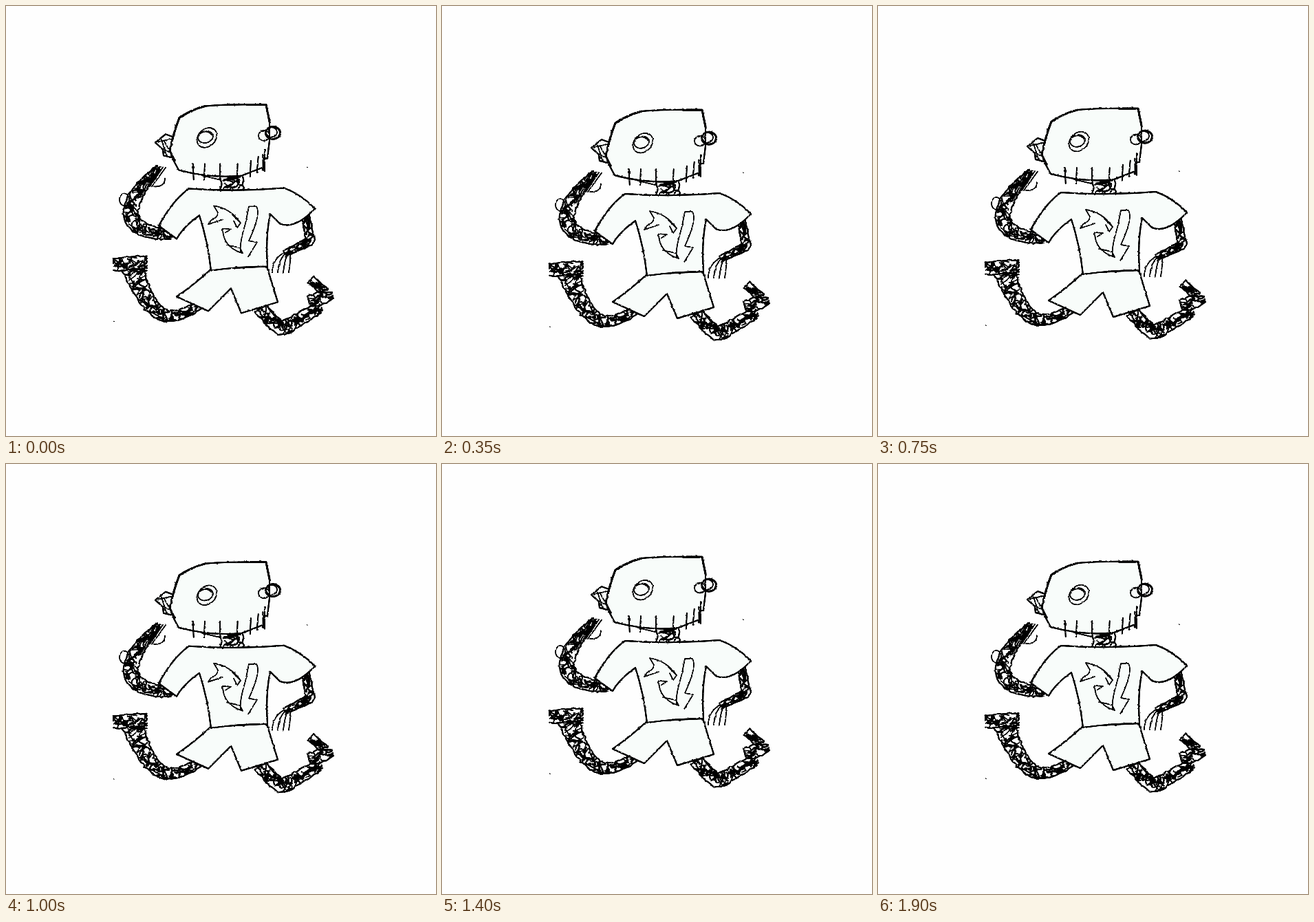
An HTML page for the animation above (1.95 s loop, 625x625 px).

```html
<!DOCTYPE html>
<html lang="en">
<head>
<meta charset="utf-8">
<title>Running doodle</title>
<style>
html, body { margin: 0; width: 100%; height: 100%; overflow: hidden; background: #fefefe }
svg { display: block; width: 100vw; height: 100vh }
path, ellipse { fill: none; stroke: #000; stroke-width: 1.4; stroke-linejoin: round; stroke-linecap: round }
.paper { fill: #fcfefd; stroke-width: 2 }
.bold { stroke-width: 2.7 }
</style>
</head>
<body>
<svg viewBox="0 0 625 625">
  <!-- wobbles the edges, then hardens the ink -->
  <filter id="ink" filterUnits="userSpaceOnUse" x="140" y="130" width="350" height="365" color-interpolation-filters="sRGB">
    <feTurbulence type="fractalNoise" baseFrequency=".25" numOctaves="2" seed="4"/>
    <feDisplacementMap in="SourceGraphic" scale="2.4" xChannelSelector="R" yChannelSelector="G"/>
    <feComponentTransfer>
      <feFuncR type="table" tableValues="0 0 .1 .6 .994"/>
      <feFuncG type="table" tableValues="0 0 .1 .6 .997"/>
      <feFuncB type="table" tableValues="0 0 .1 .6 .996"/>
      <feFuncA type="table" tableValues="0 .5 .95 1 1"/>
    </feComponentTransfer>
  </filter>
  <g id="runner"><g filter="url(#ink)">
    <g id="limbs"></g>
    <ellipse cx="172" cy="281" rx="7" ry="9"/>
    <path d="M438 234h.1M157 458h.1"/>

    <!-- shorts and shirt -->
    <path class="paper" d="M298 382Q273 405 248 422L294 443 327 410 342 446 395 430 379 378Z"/>
    <path class="paper" d="M266 265Q335 270 404 264 430 274 449 294 420 325 398 316L384 302Q377 335 380 378 340 378 298 384 293 340 281 304 258 320 248 338L222 319Q242 282 266 265Z"/>
    <path d="M341 315Q327 294 302 290L308 300Q308 307 298 311L294 317 315 310M329 303L341 315 336 322 331 312M319 329L327 324 315 323Q315 350 344 359L340 351 321 347M341 358Q339 345 348 316L353 291H364Q371 302 353 341L365 343 352 364"/>

    <!-- ear and head -->
    <path class="paper" d="M243 190L232 186 217 198 228 208 229 217 250 222"/>
    <path d="M221 197L240 193M230 196L236 207 248 206M229 207L248 219M226 194L233 216"/>
    <path class="paper" d="M238 211Q243 185 252 162 270 150 290 145 322 142 378 143L383 166V195L380 221H375L374 234 343 246Q300 251 251 238L244 225Z"/>
    <path class="bold" d="M245 224L238 210Q243 185 252 162 270 150 290 145M350 143H378L383 168"/>
    <path d="M285 246L310 252M376 208V240"/>
    <g id="teeth"></g>

    <!-- eyes -->
    <ellipse cx="292" cy="191" rx="16" ry="12.5" transform="rotate(-45 292 191)"/>
    <ellipse cx="290" cy="190" rx="11" ry="8.5" transform="rotate(-15 290 190)"/>
    <path d="M281 186Q291 178 299 187"/>
    <ellipse cx="375" cy="188" rx="8" ry="7.5"/>
    <ellipse class="bold" cx="388" cy="184" rx="10.5" ry="9"/>
    <ellipse cx="386" cy="183" rx="8" ry="7"/>
  </g></g>
</svg>
<script>
const $ = id => document.getElementById(id);
let seed = 7;
const rnd = () => (seed = seed * 16807 % 2147483647) / 2147483647;
const spread = r => (rnd() * 2 - 1) * r;

function pen(parent, d, width = 1.4) {
  const path = document.createElementNS("http://www.w3.org/2000/svg", "path");
  path.setAttribute("d", d);
  path.style.strokeWidth = width;
  parent.append(path);
  return path;
}

// a limb follows a spine; its width goes from w0 to w1, plus a bulge in the middle
function limb(d, w0, w1, bulge = 0) {
  const spine = pen($("limbs"), d, 0), length = spine.getTotalLength();
  const spot = (u, side) => {
    u = Math.min(Math.max(u, 0), 1);
    const at = spine.getPointAtLength(u * length);
    const a = spine.getPointAtLength(u * length - 3), b = spine.getPointAtLength(u * length + 3);
    const half = (w0 + (w1 - w0) * u + bulge * Math.sin(Math.PI * u)) / 2 * side;
    const turn = Math.atan2(b.y - a.y, b.x - a.x);
    return `${at.x - half * Math.sin(turn)} ${at.y + half * Math.cos(turn)} `;
  };
  spine.remove();

  for (const side of [-1, 1]) {
    let edge = "";
    for (let u = 0; u <= 1; u += 4 / length) edge += (edge ? "L" : "M") + spot(u, side + spread(.12));
    pen($("limbs"), edge, 1.9);
  }
  const reach = 14 / length;
  for (let s = 0; s < length; s += 1.9) {
    const u = s / length;
    const d = `M${spot(u, spread(1))}Q${spot(u + spread(reach), spread(1.2))}${spot(u + spread(reach), spread(1))}`;
    pen($("limbs"), d, 1 + rnd() * 1.3);
  }
}

limb("M222 235Q183 272 181 300 182 328 243 333", 8, 11, 12);   // rear arm
limb("M156 375L205 373", 18, 21);                              // rear foot
limb("M185 380Q198 425 218 442 240 462 281 434", 32, 12, -3);  // rear leg
limb("M368 438L400 470 458 437", 19, 15, 2);                   // front leg
limb("M443 397L464 416", 12, 12);                              // front toe
limb("M475 420L440 429", 8, 16, 6);
limb("M435 304L443 341 404 360", 11, 8, 2);                    // front arm
limb("M328 248V268", 33, 33);                                  // neck

// fingers
for (let i = 0; i < 5; i++) pen($("limbs"), `M${200 + 3 * i} 262L${216 + 4 * i} ${232 + spread(4)}`);
for (let i = 0; i < 4; i++) pen($("limbs"), `M${404 + 3 * i} 358Q${387 + 9 * i} 368 ${387 + 8 * i} 387`);
pen($("limbs"), "M215 262Q231 263 231 250");

// teeth crowd together towards the front
for (const x of [271, 288, 311, 336, 354, 366, 372]) {
  const y = 241 - Math.max(0, x - 345) * .5;
  pen($("teeth"), `M${x + spread(2)} ${y - 12}L${x + spread(2)} ${y + 11}`, 1.7);
}

const LOOP = 1950, STEP = 50;
function draw(now) {
  const t = Math.floor(now % LOOP / STEP) * STEP;
  const y = .4 + 8.5 * Math.sin(2 * Math.PI * t / LOOP);
  $("runner").setAttribute("transform", `translate(0 ${y.toFixed(2)})`);
  requestAnimationFrame(draw);
}
draw(performance.now());
</script>
</body>
</html>
```
